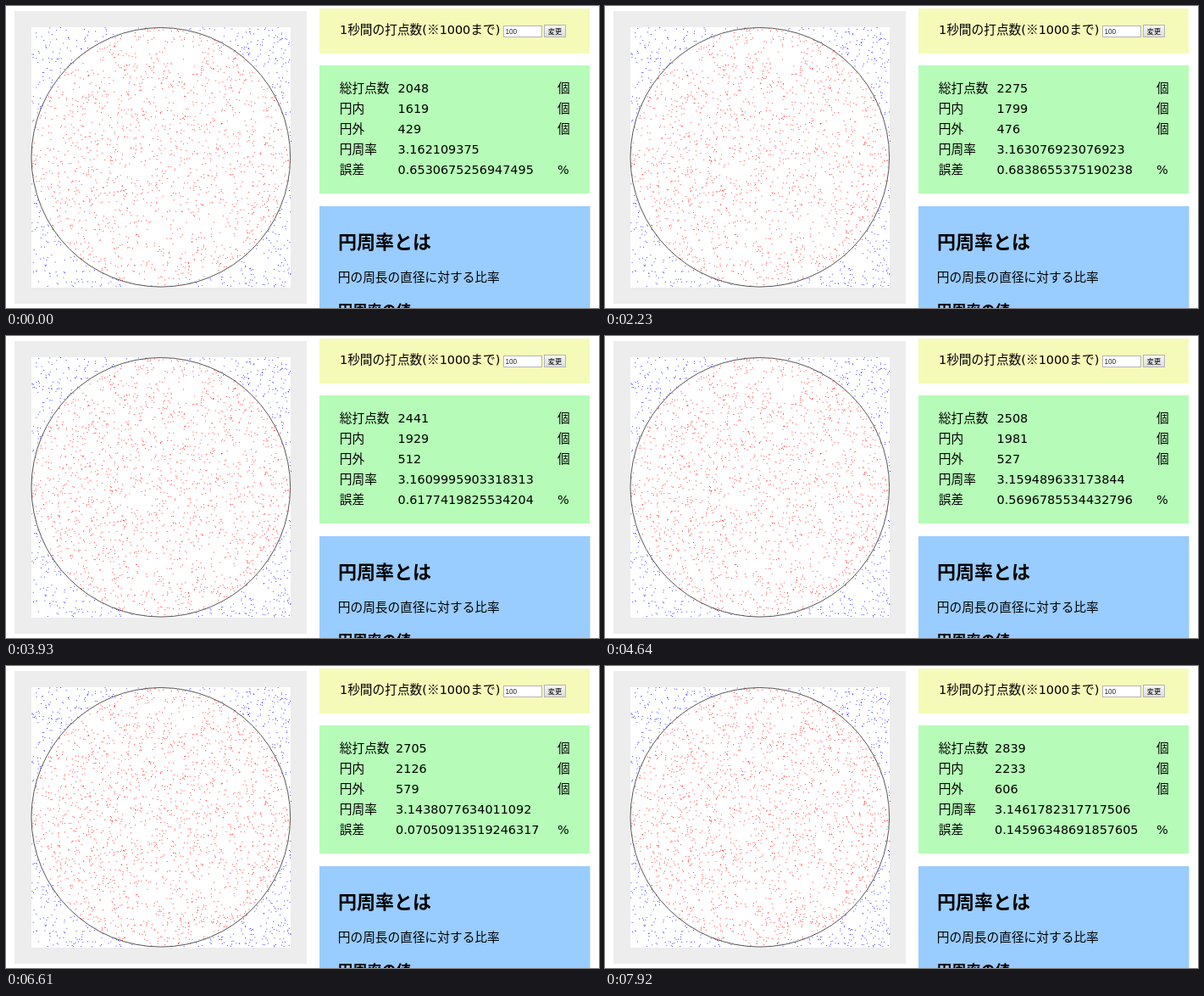
Write an HTML page with a canvas that moves like this. It is 700 px wide and 356 px high and loops after 8000 ms.

```html
<!DOCTYPE html>
<html lang="ja">
<head>
<meta charset="utf-8">
<title>円周率</title>
<style>
  html, body { margin: 0; width: 100%; height: 100%; overflow: hidden; background: #fff; }
  canvas, svg { position: absolute; left: 0; top: 0; display: block; }
  text { fill: #000; font: 350 14.7px "Noto Sans CJK JP", "Noto Sans CJK", sans-serif; }
  .latin { font: 14.4px "DejaVu Sans", sans-serif; }
  .small { font-size: 8.2px; }
  .input { font: 8.2px "Liberation Sans", sans-serif; fill: #222; }
  .h2 { font-size: 22px; font-weight: bold; }
  .h3 { font-size: 17.2px; font-weight: bold; }
</style>
</head>
<body>
<canvas id="plot" width="700" height="356"></canvas>
<svg width="700" height="356" viewBox="0 0 700 356">
  <defs>
    <linearGradient id="face" x2="0" y2="1">
      <stop offset="0" stop-color="#f6f6f6"/>
      <stop offset="1" stop-color="#dcdcdc"/>
    </linearGradient>
  </defs>

  <rect x="370" y="3" width="319" height="53" fill="#f6fab8"/>
  <text x="394" y="32.5"><tspan class="latin">1</tspan>秒間の打点数<tspan class="latin">(</tspan>※<tspan class="latin">1000</tspan>まで<tspan class="latin">)</tspan></text>
  <rect x="587.5" y="23.5" width="45" height="13" fill="#fff" stroke="#b4b4b4"/>
  <text class="input" x="589.5" y="33">100</text>
  <rect x="635.5" y="22.5" width="25" height="14" fill="url(#face)" stroke="#b4b4b4"/>
  <text class="small" x="639.8" y="33">変更</text>

  <rect x="370" y="70" width="319" height="151" fill="#b6fcb8"/>
  <g id="stats"></g>

  <rect x="370" y="236" width="319.5" height="120" fill="#99ccff"/>
  <text class="h2" x="392" y="286">円周率とは</text>
  <text x="391.8" y="325">円の周長の直径に対する比率</text>
  <text class="h3" x="392" y="364.5">円周率の値</text>
</svg>
<script>
const LOOP = 8000;
const STEP = 77, LEAD = 8; // ms per update, and how early the first one comes
const BOX = { x: 30, y: 25, size: 306 };

const COUNTS = [
  { step: 0, inside: 1619, outside: 429 },
  { step: 16, inside: 1720, outside: 454 },
  { step: 41, inside: 1872, outside: 496 },
  { step: 60, inside: 1981, outside: 527 },
  { step: 71, inside: 2044, outside: 551 },
  { step: 85, inside: 2126, outside: 579 },
  { step: 102, inside: 2233, outside: 606 }
];

function countAt(step, side) {
  const last = COUNTS.length - 1;
  const next = COUNTS.findIndex(c => c.step > step);
  const b = COUNTS[next < 0 ? last : next];
  const a = COUNTS[next < 0 ? last - 1 : next - 1];
  return Math.round(a[side] + (b[side] - a[side]) * (step - a.step) / (b.step - a.step));
}

function randomFrom(seed) {
  return () => {
    seed = (seed + 0x6D2B79F5) | 0;
    let n = Math.imul(seed ^ (seed >>> 15), 1 | seed);
    n = (n + Math.imul(n ^ (n >>> 7), 61 | n)) ^ n;
    return ((n ^ (n >>> 14)) >>> 0) / 4294967296;
  };
}

const random = randomFrom(314);
const inner = [], outer = [];
while (inner.length < 2300 || outer.length < 650) {
  const x = random(), y = random();
  const side = Math.hypot(x - 0.5, y - 0.5) <= 0.5 ? inner : outer;
  side.push({ x: BOX.x + x * BOX.size, y: BOX.y + y * BOX.size });
}

const ctx = document.getElementById("plot").getContext("2d");

function drawDots(dots, count, color) {
  ctx.fillStyle = color;
  for (const dot of dots.slice(0, count)) ctx.fillRect(dot.x, dot.y, 0.85, 0.85);
}

function drawPlot(inside, outside) {
  ctx.fillStyle = "#ededed";
  ctx.fillRect(10, 6, 345, 345);
  ctx.fillStyle = "#fff";
  ctx.fillRect(BOX.x, BOX.y, BOX.size, BOX.size + 1);
  drawDots(inner, inside, "#f00");
  drawDots(outer, outside, "#00f");
  ctx.strokeStyle = "#555";
  ctx.lineWidth = 1;
  ctx.beginPath();
  ctx.arc(182.8, 178.3, 152.8, 0, Math.PI * 2);
  ctx.stroke();
}

const stats = document.getElementById("stats");

function addText(x, y, content, className) {
  const el = document.createElementNS(stats.namespaceURI, "text");
  el.setAttribute("x", x);
  el.setAttribute("y", y);
  if (className) el.setAttribute("class", className);
  el.textContent = content;
  return stats.appendChild(el);
}

const values = [
  ["総打点数", "個"], ["円内", "個"], ["円外", "個"], ["円周率", ""], ["誤差", "%"]
].map(([label, unit], i) => {
  const y = 102 + i * 24;
  addText(393.8, y, label);
  addText(651, y, unit, unit === "%" ? "latin" : "");
  return addText(0, y, "", "latin");
});

function showStats(inside, outside) {
  const total = inside + outside;
  const pi = 4 * inside / total;
  const error = Math.abs(pi - Math.PI) / Math.PI * 100;
  const texts = [total, inside, outside, pi, error].map(String);
  // the column moves left as its longest entry grows
  const longest = Math.max(...texts.map(s => s.length));
  const x = 462.6 - 2.5 * (longest - 18);
  values.forEach((el, i) => {
    el.textContent = texts[i];
    el.setAttribute("x", x);
  });
}

const start = performance.now();
let shown = -1;

function render() {
  const time = (performance.now() - start) % LOOP;
  const step = Math.floor((time + LEAD) / STEP);
  if (step !== shown) {
    shown = step;
    const inside = countAt(step, "inside");
    const outside = countAt(step, "outside");
    drawPlot(inside, outside);
    showStats(inside, outside);
  }
  requestAnimationFrame(render);
}
render();
</script>
</body>
</html>
```
